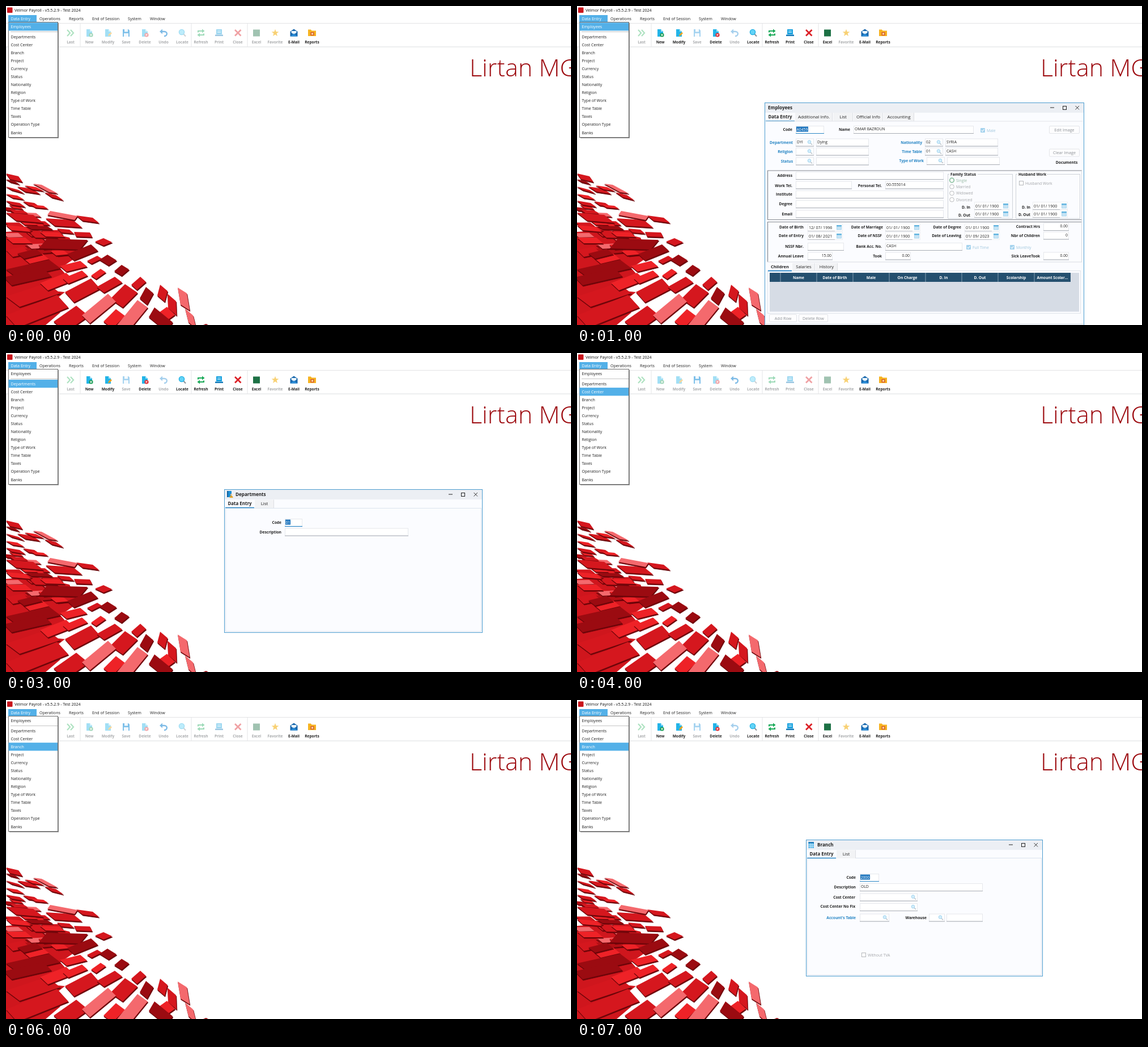
These frames come from a looping animation (997 by 562 pixels, 8000 ms). An HTML page:

```html
<!DOCTYPE html>
<html lang="en">
<head>
<meta charset="utf-8">
<title>Payroll</title>
<style>
html, body { margin: 0; width: 100%; height: 100%; overflow: hidden; background: #fff; }
svg { display: block; width: 997px; height: 562px; font-family: "Open Sans", "Noto Sans", sans-serif; }
</style>
</head>
<body>
<svg id="stage" viewBox="0 0 997 562" xmlns="http://www.w3.org/2000/svg"></svg>
<script>
const BLUE = '#53b0e8', LINK = '#2484c4', INK = '#222', GREY = '#a3a5a8';

// ---- drawing helpers, all return markup ----
const esc = s => s.replace(/&/g, '&amp;');
const rect = (x, y, w, h, fill, extra = '') =>
  `<rect x="${x}" y="${y}" width="${w}" height="${h}" fill="${fill}" ${extra}/>`;
const path = (d, fill, stroke = 'none', w = 1) =>
  `<path d="${d}" fill="${fill}" stroke="${stroke}" stroke-width="${w}"/>`;
const line = (x1, y1, x2, y2, c, w = 1) => path(`M${x1} ${y1}L${x2} ${y2}`, 'none', c, w);
const frame = (x, y, w, h, c, fill = 'none') =>
  rect(x + .5, y + .5, w - 1, h - 1, fill, `stroke="${c}"`);
const circle = (x, y, r, fill, extra = '') => `<circle cx="${x}" cy="${y}" r="${r}" fill="${fill}" ${extra}/>`;
const ANCHOR = { l: 'start', c: 'middle', r: 'end' };
// y is the middle of the lower-case letters
const text = (s, x, y, { size = 7.1, fill = INK, bold = 0, at = 'l' } = {}) =>
  `<text x="${x}" y="${y + 2.5}" font-size="${size}" fill="${fill}" font-weight="${bold ? 700 : 400}" text-anchor="${ANCHOR[at]}">${esc(s)}</text>`;
const label = (s, x, y, fill = INK) => text(s, x, y, { size: 6.7, bold: 1, at: 'r', fill });
const link = (s, x, y) => label(s, x, y, LINK);

const lens = (x, y) => circle(x - 1, y - 1, 2.8, '#d4eefb', 'stroke="#9fd3ef"') +
  line(x + 1.2, y + 1.2, x + 4, y + 4, '#b9c3cc', 1.6);
const field = (x, y, w, h = 13, s = '', at = 'l') =>
  frame(x, y, w, h, '#e6e8ec', '#fff') + line(x, y + h - .5, x + w, y + h - .5, '#a9adb4') +
  (s ? text(s, at === 'r' ? x + w - 2 : x + 2, y + 5.7, { size: 6.8, at }) : '');
const finder = (x, y, w, s) => field(x, y, w, 14, s) + lens(x + w - 7, y + 7);
const chosen = (x, y, w, s, sw) =>
  field(x, y, w, 14) + line(x, y + 13.5, x + w, y + 13.5, '#2b86c5', 1.2) +
  rect(x + 1, y + 1.5, sw, 9, '#1d74bd') + text(s, x + 1.5, y + 6, { size: 6.8, fill: '#fff' });
const date = (x, y, s = '01/ 01/ 1900') =>
  frame(x, y - 7, 62, 14, '#eceef1', '#fff') + line(x, y + 6.5, x + 48, y + 6.5, '#b9bcc2') +
  text(s, x + 2, y, { size: 7.1 }) + rect(x + 51, y - 4, 9, 8.5, '#a9d5ee') +
  rect(x + 51, y - 4, 9, 2.2, '#5fb2de') +
  path(`M${x + 52} ${y + .3}h7M${x + 52} ${y + 2.4}h7`, 'none', '#f4fbff', .8);
const check = (x, y, s, on) => on
  ? rect(x, y - 4, 8, 8, '#a5d3ee', 'rx="1"') + path(`M${x + 1.7} ${y}l1.8 2 3-4`, 'none', '#fff', 1.1) +
    text(s, x + 11, y, { size: 6.9, fill: '#9fc6dd' })
  : frame(x, y - 4, 8, 8, '#b5b7ba', '#fff') + text(s, x + 11, y, { size: 6.9, fill: GREY });
const button = (s, x, y, w, fill = '#8b8f94') =>
  rect(x + .5, y + .5, w - 1, 13, '#fdfdfe', 'stroke="#e3e5e9" rx="1.5"') +
  text(s, x + w / 2, y + 7, { size: 7.2, fill, at: 'c' });
const group = (s, x, y, w, h, tw) =>
  frame(x, y, w, h, '#cfd3d8') + rect(x + 3, y - 2, tw, 6, '#fbfcff') +
  text(s, x + 5, y, { size: 6.7, bold: 1 });

// tabs: [caption, left, right], the first is active
const tabs = (list, y, h, size = 7.9) => list.map(([s, a, b], i) =>
  rect(a, y, b - a, h, i ? '#f2f3f5' : '#fbfcff') +
  (i ? line(b - .5, y, b - .5, y + h, '#dddfe3') : line(a, y + h - .5, b, y + h - .5, '#2b86c5', 1.5)) +
  text(s, (a + b) / 2, y + h / 2 - .3, { size, bold: !i, at: 'c' })).join('');

function win(title, x, y, w, h, tx, icon = '') {
  const m = y + 9, r = x + w;
  return rect(x, y, w, h, '#fbfcff') + rect(x, y, w, 18, '#eceff4') +
    frame(x, y, w, h, '#4c9ccf') + icon +
    text(title, tx, m, { size: 8.1, bold: 1 }) +
    line(r - 60, m, r - 53, m, '#222') + frame(r - 38, m - 3, 7, 7, '#222') +
    path(`M${r - 15.5} ${m - 3}l6.5 6.5m0-6.5l-6.5 6.5`, 'none', '#222', .9);
}

// ---- background ----
const quad = (x, y, ax, ay, bx, by) => `M${x} ${y}l${ax} ${ay}l${bx} ${by}l${-ax} ${-ay}z`;
const tiles = (fill, list) => list.map(([x, y, ...v]) =>
  path(quad(x + .8, y + 2, ...v), '#6d0509', '#6d0509', .8) +
  path(quad(x, y, ...v), fill)).join('');

function scatter(n) {
  let seed = 11, out = '';
  const rnd = () => (seed = seed * 16807 % 2147483647) / 2147483647;
  const tone = ['#d5171e', '#ee2227', '#b30f15', '#f4696d'];
  for (let i = 0; i < n; i++) {
    const y = 350 + 82 * rnd(), x = -8 + (y - 320) * rnd();
    const k = (y - 300) / 130;
    out += tiles(tone[Math.floor(rnd() * 3.3)], [[x, y, 16 + 14 * rnd(), 4 - 6 * k, 7 + 3 * k, 5 + 3 * k]]);
  }
  return out;
}

const backdrop =
  path('M0 398L52 394L112 408L128 440L96 462L110 478L62 500L104 504L66 534L96 540L70 562H0z', '#cf161d') +
  scatter(24) +
  tiles('#d5171e', [
    [0, 295, 22, 5, 7, 10], [20, 318, 26, 4, 14, 9], [0, 318, 22, 6, 10, 6],
    [68, 328, 20, 5, 13, 9], [30, 344, 20, 3, 10, 7], [0, 343, 24, 4, 10, 7],
    [124, 369, 29, 4, 11, 9], [70, 374, 48, 3, 16, 13], [0, 364, 48, 4, 18, 14],
    [120, 398, 28, 1, 4, 8], [157, 415, 15, -6, 15, 7], [90, 392, 22, 2, 8, 7],
    [40, 398, 40, 1, 12, 10], [143, 449, 18, -9, 8, 5], [0, 430, 30, -6, 12, 12],
    [104, 504, 46, -24, 16, 18], [160, 495, 32, -18, 13, 10], [184, 516, 26, -26, 22, 15],
    [221, 491, 16, -14, 10, 9], [267, 510, 5, -19, 13, 11], [285, 507, 15, 13, 1, 25],
    [0, 512, 72, -24, 24, 18], [0, 545, 90, -36, 20, 22], [84, 556, 40, -28, 22, 18]]) +
  tiles('#ee2227', [
    [33, 316, 20, 3, 14, 7], [0, 331, 20, 3, 12, 7], [44, 350, 22, 2, 8, 5],
    [0, 386, 34, 3, 10, 9], [0, 408, 34, 0, 12, 10], [60, 398, 34, 1, 10, 8],
    [30, 444, 34, -8, 12, 10], [95, 458, 36, -9, 12, 10], [150, 475, 17, -12, 9, 6],
    [60, 488, 46, -18, 14, 13], [172, 556, 22, -22, 16, 12], [100, 480, 34, -14, 10, 9],
    [270, 540, 14, -10, 14, 14]]) +
  tiles('#9b0b11', [
    [0, 305, 16, 4, 8, 5], [35, 387, 38, 1, 10, 6], [58, 427, 14, -17, 72, 2],
    [108, 437, 42, -17, 12, 11], [20, 436, 32, -8, 12, 9], [0, 464, 76, -17, 20, 15],
    [-4, 478, 70, -16, 14, 14], [165, 447, 14, -9, 16, 10], [191, 467, 13, -11, 13, 8],
    [236, 515, 11, -20, 13, 11], [252, 548, 10, -17, 32, 26], [348, 562, 5, -2, 4, 2]]) +
  tiles('#f4696d', [
    [48, 313, 15, 2, 28, 15], [78, 361, 48, 9, -5, 7], [134, 545, 46, -38, 14, 14],
    [196, 562, 36, -44, 18, 13], [303, 496, 16, 10, 5, 30], [316, 533, 14, 12, 6, 24]]) +
  `<text x="818" y="124" font-size="43" font-weight="300" fill="#9d0b10">Lirtan MG</text>`;

// ---- title, menu bar, toolbar ----
const doc = x => path(`M${x - 5} 41h6l4 4v9h-10z`, '#23b4e8') + path(`M${x + 1} 41v4h4z`, '#a9e4f8');
const badge = (x, fill, d) => circle(x + 3, 51, 3.6, fill) + path(d, 'none', '#fff', 1.1);
const ICONS = {
  Last: x => path(`M${x - 6} 42l5 5.500-5 5.500M${x} 42l5 5.500-5 5.500`, 'none', '#3dbb6c', 2.2),
  New: x => doc(x) + badge(x, '#1a9d55', `M${x + 1} 51h4m-2-2v4`),
  Modify: x => doc(x) + path(`M${x} 53l1-3 4-4 2 2-4 4z`, '#f2a31b'),
  Save: x => path(`M${x - 6} 41h10l2 2v11h-12z`, '#2a97dc') + rect(x - 3, 41, 6, 4.500, '#e8f5fc') + rect(x - 4, 48, 8, 6, '#e8f5fc'),
  Delete: x => doc(x) + badge(x, '#df2b32', `M${x + 1.6} 49.600l2.800 2.800m0-2.800l-2.800 2.800`),
  Undo: x => path(`M${x - 4} 45h5c7 0 6 8 0 8`, 'none', '#2a8fd6', 2.4) + path(`M${x - 7} 45l5-4.500v9z`, '#2a8fd6'),
  Locate: x => line(x + 2, 49, x + 6, 53.500, '#8a949c', 2) + circle(x - 1, 46, 4.600, '#63d3f6', 'stroke="#1fb0e4" stroke-width="1.400"'),
  Refresh: x => path(`M${x - 5} 46.500v-2.500h8M${x + 5} 48.500v2.500h-8`, 'none', '#18a957', 2) +
    path(`M${x + 2} 40.500l4.500 3.500-4.500 3.500zM${x - 2} 47.500l-4.500 3.500 4.500 3.500z`, '#18a957'),
  Print: x => rect(x - 5, 41, 10, 9, '#1ba3e0') + path(`M${x - 3} 44h6m-6 2.500h6`, 'none', '#d9f2fc', 1) + rect(x - 7, 50.500, 14, 2.500, '#1379b8'),
  Close: x => path(`M${x - 5} 42l10.500 10.500m0-10.500l-10.500 10.500`, 'none', '#dc2228', 2.800),
  Excel: x => rect(x - 6, 41.500, 12, 12, '#1d7145'),
  Favorite: x => path(Array.from({ length: 10 }, (_, i) => {
    const r = i % 2 ? 2.700 : 6.700, a = i * Math.PI / 5;
    return `${i ? 'L' : 'M'}${(x + r * Math.sin(a)).toFixed(1)} ${(47.5 - r * Math.cos(a)).toFixed(1)}`;
  }).join('') + 'z', '#f5b82a'),
  'E-Mail': x => path(`M${x - 6.500} 45l6.500-4.500 6.500 4.500v8.500h-13z`, '#1767ad') +
    path(`M${x - 4.500} 44h9v3l-4.500 3-4.500-3z`, '#e9f4fb') + path(`M${x - 6.500} 53.500l6.500-5 6.500 5z`, '#2b8cd6'),
  Reports: x => path(`M${x - 7} 41.500h5l1.500 2h7.500v9.500h-14z`, '#f6b321') + rect(x - 2.500, 46, 6, 6, '#d75b32') + rect(x - 1, 47.500, 3, 3, '#fbe3a0')
};
const names = Object.keys(ICONS);
const OFF_WITH_WINDOW = ['Last', 'Save', 'Undo', 'Favorite'];

function toolbar(open) {
  return names.map((s, i) => {
    const x = 114 + Math.round(i * 32.8);
    const on = open ? !OFF_WITH_WINDOW.includes(s) : i > 11;
    const dim = !open && (s === 'Save' || s === 'Undo') ? .6 : .42;
    const a = on ? 1 : s === 'Favorite' ? .65 : dim;
    return `<g opacity="${a}">${ICONS[s](x)}</g>` +
      text(s, x, 63.8, { size: 6.55, bold: 1, at: 'c', fill: on ? INK : '#a9abad' });
  }).join('');
}

const bar = rect(0, 0, 997, 72, '#fff') + rect(2, 2.500, 9.500, 9.500, '#c9151c', 'rx="1"') +
  text('Velmor Payroll - v5.5.2.9 - Test 2024', 15, 7.3, { fill: '#111' }) +
  line(0, 30.5, 997, 30.5, '#e2e3e5') + line(0, 72, 997, 72, '#dcdee0') +
  line(.5, 72, .5, 296, '#dfe1e3') +
  [131, 327, 426].map(x => line(x, 31, x, 72, '#e4e5e7')).join('') +
  rect(4, 16, 50, 13, BLUE) + text('Data Entry', 8.5, 22.7, { fill: '#fff' }) +
  [['Operations', 59], ['Reports', 111], ['End of Session', 152], ['System', 215], ['Window', 254]]
    .map(([s, x]) => text(s, x, 22.7)).join('');

const ITEMS = ['Employees', 'Departments', 'Cost Center', 'Branch', 'Project', 'Currency', 'Status',
  'Nationality', 'Religion', 'Type of Work', 'Time Table', 'Taxes', 'Operation Type', 'Banks'];

const menu = pick => rect(6, 30, 87, 203, '#8d8d8d') + frame(4, 28, 88, 204, '#6c6c6c', '#fff') +
  line(8, 45.5, 91, 45.5, '#c4c4c4') +
  ITEMS.map((s, i) => {
    const y = i ? 54 + (i - 1) * 14.09 : 36.3;
    return (i === pick ? rect(4.500, y - 7, 86.500, 14.2, BLUE) : '') +
      text(s, 8.5, y, { fill: i === pick ? '#fff' : INK });
  }).join('');

// ---- windows ----
function employees() {
  const heads = ['', 'Name', 'Date of Birth', 'Male', 'On Charge', 'D. In', 'D. Out', 'Scolarship', 'Amount Scolar...'];
  const edge = i => i ? 359 + (i - 1) * 64 : 340;
  const pair = (s, x, y, a = '', b = '') => link(s, x, y) + finder(x + 5, y - 6.500, 32, a) + field(x + 41, y - 6.500, 93, 14, b);
  return win('Employees', 331, 170, 564, 400, 337) +
    tabs([['Data Entry', 333, 384], ['Additional Info.', 385, 451], ['List', 452, 487],
      ['Official Info', 488, 540], ['Accounting', 541, 595]], 188, 15) +
    line(333, 203, 893, 203, '#e1e4e9') +
    label('Code', 380, 217.5) + chosen(386, 211, 50, 'A0459', 21) +
    label('Name', 482, 217.5) + field(488, 211, 212, 14, 'OMAR BAZROUN') + check(712, 219, 'Male', 1) +
    button('Edit Image', 833, 211, 54) + button('Clear Image', 833, 251.500, 54) +
    text('Documents', 864, 275, { size: 6.8, bold: 1, at: 'c' }) +
    pair('Department', 381, 240, 'DYI', 'Dying') + pair('Religion', 381, 256) + pair('Status', 381, 273) +
    pair('Nationality', 609, 240, '02', 'SYRIA') + pair('Time Table', 609, 256, '01', 'CASH') + pair('Type of Work', 612, 272.5).replace(/^/, '') +
    path('M336.500 376V290H891M336 376.500H891M336.500 451V380.500H891', 'none', '#85898f', 1.2) +
    line(890.5, 290, 890.5, 451, '#d9dce1') + line(336, 451, 891, 451, '#d9dce1') +
    [['Address', 298.5], ['Institute', 331.5], ['Degree', 348.7], ['Email', 366]]
      .map(([s, y]) => label(s, 380, y) + field(386, y - 6.500, 261, 14)).join('') +
    label('Work Tel.', 380, 316) + field(386, 308.500, 99, 14) +
    label('Personal Tel.', 538, 316) + field(544, 308.500, 103, 14, '00-555014') +
    group('Family Status', 654, 296, 115, 79, 50) +
    ['Single', 'Married', 'Widowed', 'Divorced'].map((s, i) => {
      const y = 307 + i * 11.4, c = i ? '#b9bbbe' : '#8fc3a4';
      return circle(661.500, y, 3.800, '#fff', `stroke="${c}" stroke-width="${i ? 1 : 1.8}"`) +
        text(s, 669, y, { size: 6.9, fill: i ? GREY : '#95b8a2' });
    }).join('') +
    label('D. In', 694, 354) + date(701, 352) + label('D. Out', 694, 368) + date(701, 366) +
    group('Husband Work', 774, 296, 114, 79, 52) + check(780, 312, 'Husband Work') +
    label('D. In', 800, 354) + date(804, 352) + label('D. Out', 800, 367) + date(804, 366) +
    label('Date of Birth', 400, 389) + date(407, 390, '12/ 07/ 1996') +
    label('Date of Entry', 400, 404.5) + date(407, 405, '01/ 08/ 2021') +
    label('Date of Marriage', 540, 389.5) + date(544, 390) + label('Date of NSSF', 538, 404.5) + date(544, 405) +
    label('Date of Degree', 678, 389) + date(684, 390) + label('Date of Leaving', 678, 404.5) + date(684, 405, '01/ 09/ 2023') +
    label('Contract Hrs', 817, 388.5) + field(823, 382, 45, 14, '0.00', 'r') +
    label('Nbr of Children', 817, 404) + field(823, 397.500, 45, 14, '0', 'r') +
    label('NSSF Nbr.', 400, 423) + field(407, 417, 64, 14) +
    label('Bank Acc. No.', 538, 423) + field(544, 417, 136, 14, 'CASH') +
    check(687, 425, 'Full Time', 1) + check(764, 425, 'Monthly', 1) +
    label('Annual Leave', 400, 440) + field(407, 433.500, 44, 14, '15.00', 'r') +
    label('Took', 538, 440) + field(544, 433.500, 45, 14, '0.00', 'r') +
    label('Sick LeaveTook', 817, 440) + field(823, 433.500, 45, 14, '0.00', 'r') +
    tabs([['Children', 337, 379], ['Salaries', 380, 420], ['History', 421, 460]], 453, 14, 7.6) +
    frame(336, 466, 553, 76, '#dfe3e9') + line(337, 466.5, 379, 466.5, '#2b86c5', 1.5) +
    rect(340, 470, 546, 68.500, '#d6dce5') + rect(340, 470, 531, 16, '#25506f') +
    heads.map((s, i) => text(s, (edge(i) + edge(i + 1)) / 2, 478, { size: 6.7, bold: 1, at: 'c', fill: '#fff' }) +
      (i ? line(edge(i), 470, edge(i), 486, '#9fb4c4', .8) : '')).join('') +
    button('Add Row', 339, 543, 49) + button('Delete Row', 391, 543, 52) +
    line(333, 560.5, 893, 560.5, '#cfd5dc');
}

const bookIcon = rect(390, 243, 8, 11, '#1c8fd4', 'rx="1"') + rect(390, 243, 2, 11, '#0f5f9c') +
  circle(397.500, 249.500, 1.600, '#f3c08b') + path('M394.500 255c0-5 6-5 6 0z', '#e0a32a');
const gridIcon = rect(408.500, 250, 9.500, 11, '#4fb3e8') + rect(408.500, 250, 9.500, 2.500, '#1a78b8') +
  path('M408.500 255h9.500m-9.500 3h9.500M411.700 252v9M414.800 252v9', 'none', '#e4f4fc', .8);

const sheet = (title, code, sw) => win(title, 385, 240, 456, 253, 405, bookIcon) +
  frame(387, 273, 452, 218, '#dce4ee') + tabs([['Data Entry', 387, 438], ['List', 439, 473]], 258.500, 14.500) +
  label('Code', 486, 298.5) + chosen(492, 292, 31, code, sw) +
  label('Description', 486, 315) + field(492, 308.500, 218, 14);

const costCenter = () => sheet('Cost Center', 'SAL', 14) +
  label('Percentage', 486, 333) + field(492, 326.500, 33, 14, '0.00', 'r') + text('%', 532, 333, { size: 6.9, bold: 1 }) +
  label('Credit Limit Currency', 479, 352) + finder(492, 346, 33) + field(528, 346, 65, 14) +
  label('Credit Limit', 486, 369) + field(492, 362, 101, 14, '0.000', 'r') +
  label('Receivables&Payables', 486, 386.5) + frame(492, 380, 101, 13, '#d9dce0', '#fff') +
  text('Payables | 01', 495, 386.3, { size: 7.2, bold: 1, fill: '#a4a7aa' }) +
  path('M585 385.500l2.500 2.500 2.500-2.500', 'none', '#999') +
  label('Details', 486, 409) + field(492, 397, 234, 52) + rect(715, 398, 10, 50, '#eff0f2') +
  path('M718 404l2.500-2.500 2.500 2.500M718 442l2.500 2.500 2.500-2.500', 'none', '#a8abb0');

const branch = () => win('Branch', 404, 246, 418, 241, 424, gridIcon) +
  frame(406, 278, 414, 207, '#dce4ee') + tabs([['Data Entry', 406, 457], ['List', 458, 492]], 264.500, 14.500) +
  label('Code', 492, 312.5) + chosen(499, 306, 34, '2000', 17) +
  label('Description', 492, 329.5) + field(499, 323, 217, 14, 'OLD') +
  label('Cost Center', 491, 347) + finder(499, 340.500, 102) +
  label('Cost Center No Fix', 491, 363.7) + finder(499, 358, 102) +
  link("Account's Table", 492, 383) + finder(499, 376.500, 52) +
  label('Warehouse', 617, 383) + finder(621, 376.500, 28) + field(652, 376.500, 64, 14) +
  check(502, 449, 'Without TVA');

const windows = [employees, () => sheet('Departments', '01', 9), costCenter, branch];

// ---- timeline: each entry is picked, then its window opens a second later ----
const stage = document.getElementById('stage');
const scenes = Array.from({ length: 8 }, (_, i) => {
  const pick = i >> 1, open = i % 2;
  return backdrop + bar + toolbar(open) + (open ? windows[pick]() : '') + menu(pick);
});
let shown = -1;
function draw(ms) {
  const i = Math.floor(ms % 8000 / 1000);
  if (i !== shown) stage.innerHTML = scenes[shown = i];
}
function tick() {
  draw(performance.now());
  requestAnimationFrame(tick);
}
tick();
</script>
</body>
</html>
```
